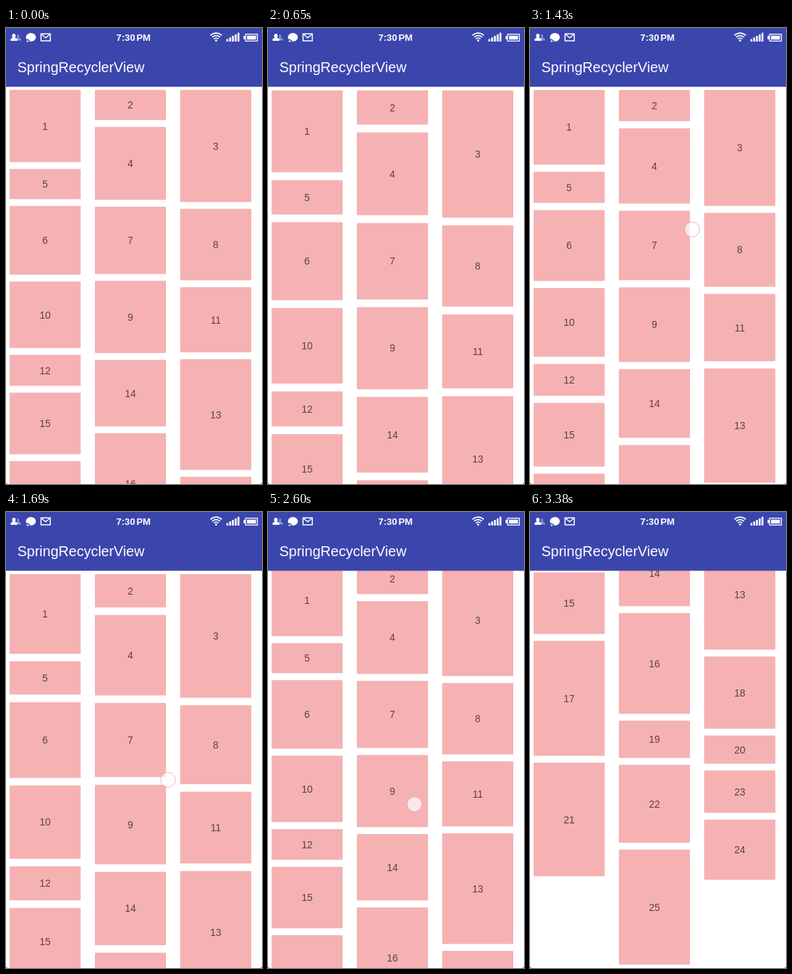
Recreate the animation shown at these times as an HTML page with a canvas. Size 360x640 px, loop 3.51 s.

```html
<!DOCTYPE html>
<html lang="en">
<head>
<meta charset="utf-8">
<title>SpringRecyclerView</title>
<style>
  html, body { margin: 0; width: 100%; height: 100%; overflow: hidden; background: #fff; }
  canvas { display: block; width: 360px; height: 640px; }
</style>
</head>
<body>
<canvas id="stage" width="360" height="640"></canvas>
<script>
const ctx = document.getElementById('stage').getContext('2d');
const LOOP = 3510, STEP = 130;
const TOP = 82, BOTTOM = 640, GAP = 9.6;
const WHITE = '#fff', INDIGO = '#3b46ad', PINK = '#f6b2b3';
const FONT = '"Liberation Sans", Arial, sans-serif';

// Heights with gap, in card order; every card goes to the shortest column.
const heights = [111, 52, 167, 112, 52, 106, 104, 110, 111, 103, 101, 53, 165,
  103, 96, 151, 171, 111, 62, 49, 169, 119, 69, 94, 171];
const ends = Array(3).fill(TOP + GAP / 2);
const cards = heights.map((height, i) => {
  const col = ends.indexOf(Math.min(...ends));
  const y = ends[col];
  ends[col] += height;
  return { label: i + 1, x: 5 + col * 120, y, h: height - GAP };
});
const MAX_SCROLL = Math.max(...ends) - GAP / 2 - BOTTOM;

// Two pulls stretch the list and spring back, then a fling scrolls to its end.
const STRETCH = .147, PULL_LENGTH = 200, BOUNCE = .02;
const pulls = [
  { down: 40, up: 560, rest: 1088, x: 193, y: 316 },
  { down: 1180, up: 1986, rest: 2299, x: 228, y: 237 }
];
const fling = { down: 2537, up: 2800, end: 3120, x: 206, y: 424 };

function ease(from, to, t) {
  const p = Math.min(1, Math.max(0, (t - from) / (to - from)));
  return p * p * (3 - 2 * p);
}

const isHeld = (touch, t) => t >= touch.down && t < touch.up;

function pose(t) {
  const stretch = pulls.reduce((sum, { down, up, rest }) =>
    sum + STRETCH * (ease(down, up, t) - ease(up, rest, t)), 0);
  const bounce = Math.max(0, BOUNCE * Math.sin(Math.PI * (t - fling.end) / (2 * STEP)));
  const scroll = MAX_SCROLL * ease(fling.down, fling.end, t);
  const pivot = t > fling.end ? BOTTOM : TOP;
  return { scroll, pivot, scale: 1 + stretch + (t > fling.end ? bounce : 0) };
}

function text(str, x, y, font, align = 'left', color = WHITE) {
  ctx.font = font + ' ' + FONT;
  ctx.fillStyle = color;
  ctx.textAlign = align;
  ctx.fillText(str, x, y);
}

function rect(x, y, w, h, color, r = 0) {
  ctx.fillStyle = color;
  ctx.beginPath();
  ctx.roundRect(x, y, w, h, r);
  ctx.fill();
}

function fill(d, color = WHITE) {
  ctx.fillStyle = color;
  ctx.fill(new Path2D(d));
}

function line(d, width) {
  ctx.strokeStyle = WHITE;
  ctx.lineWidth = width;
  ctx.stroke(new Path2D(d));
}

function drawCards({ scroll, pivot, scale }) {
  for (const { label, x, y, h } of cards) {
    const top = pivot + (y - scroll - pivot) * scale;
    const height = h * scale;
    rect(x, top, 100, height, PINK, 1);
    text(label, x + 50, top + height / 2 + 5, '14px', 'center', '#5c4243');
  }
}

function drawTouch(t, scroll) {
  const pull = pulls.find(p => isHeld(p, t));
  if (pull) dot(pull.x, pull.y + PULL_LENGTH * ease(pull.down, pull.up, t));
  if (isHeld(fling, t)) dot(fling.x, fling.y - scroll);
}

function dot(x, y) {
  ctx.beginPath();
  ctx.arc(x, y, 10.5, 0, 7);
  ctx.fillStyle = 'rgba(255,255,255,.7)';
  ctx.fill();
  ctx.strokeStyle = 'rgba(220,150,170,.7)';
  ctx.lineWidth = 1;
  ctx.stroke();
}

function drawHeader() {
  rect(0, 0, 360, TOP + .4, INDIGO);
  text('SpringRecyclerView', 16, 62, '20px');
  text('7:30', 155, 18, 'bold 13.3px');
  text('PM', 183.5, 18, 'bold 13.3px');

  // people, chat bubble, mail
  fill('M16 9a2 2.4 0 0 1 1.5 4.4l3.5 1.6v2.5h-6z', '#8f95cf');
  fill('M11 8a2.5 3 0 0 1 1.4 5.6l3.6 1.6v2.8H6.5v-2.8l3.2-1.6A2.5 3 0 0 1 11 8z');
  fill('M28 13a7 6 0 0 1 14 0a7 6 0 0 1-14 0zM29.5 15v5l5-2z');
  line('M49.3 8.2h13v9.8h-13zl6.5 5.5 6.5-5.5', 1.5);

  // wifi
  for (let r = 4.5; r < 12; r += 3.4) {
    const d = r * Math.SQRT1_2;
    line(`M${295.5 - d} ${18.5 - d}a${r} ${r} 0 0 1 ${2 * d} 0`, 1.7);
  }
  rect(294, 16, 3, 3, WHITE, 1.5);

  // signal and battery
  for (let i = 0; i < 5; i++) {
    const h = 3.5 + i * 2.2;
    rect(310 + i * 3.9, 19 - h, 2.6, h, WHITE);
  }
  rect(334, 11, 2.5, 5, WHITE, 1);
  line('M337 8.7h16.5v9.6H337z', 1.3);
  rect(339, 10.7, 12.5, 5.6, WHITE);
}

function draw(t) {
  const now = pose(t);
  rect(0, 0, 360, 640, WHITE);
  drawCards(now);
  drawTouch(t, now.scroll);
  drawHeader();
  fill('M0 638l2 2H0zM360 638l-2 2h2z', '#777');
}

const start = performance.now();

function frame() {
  const elapsed = (performance.now() - start) % LOOP;
  draw(Math.floor(elapsed / STEP) * STEP);
  requestAnimationFrame(frame);
}

frame();
</script>
</body>
</html>
```
